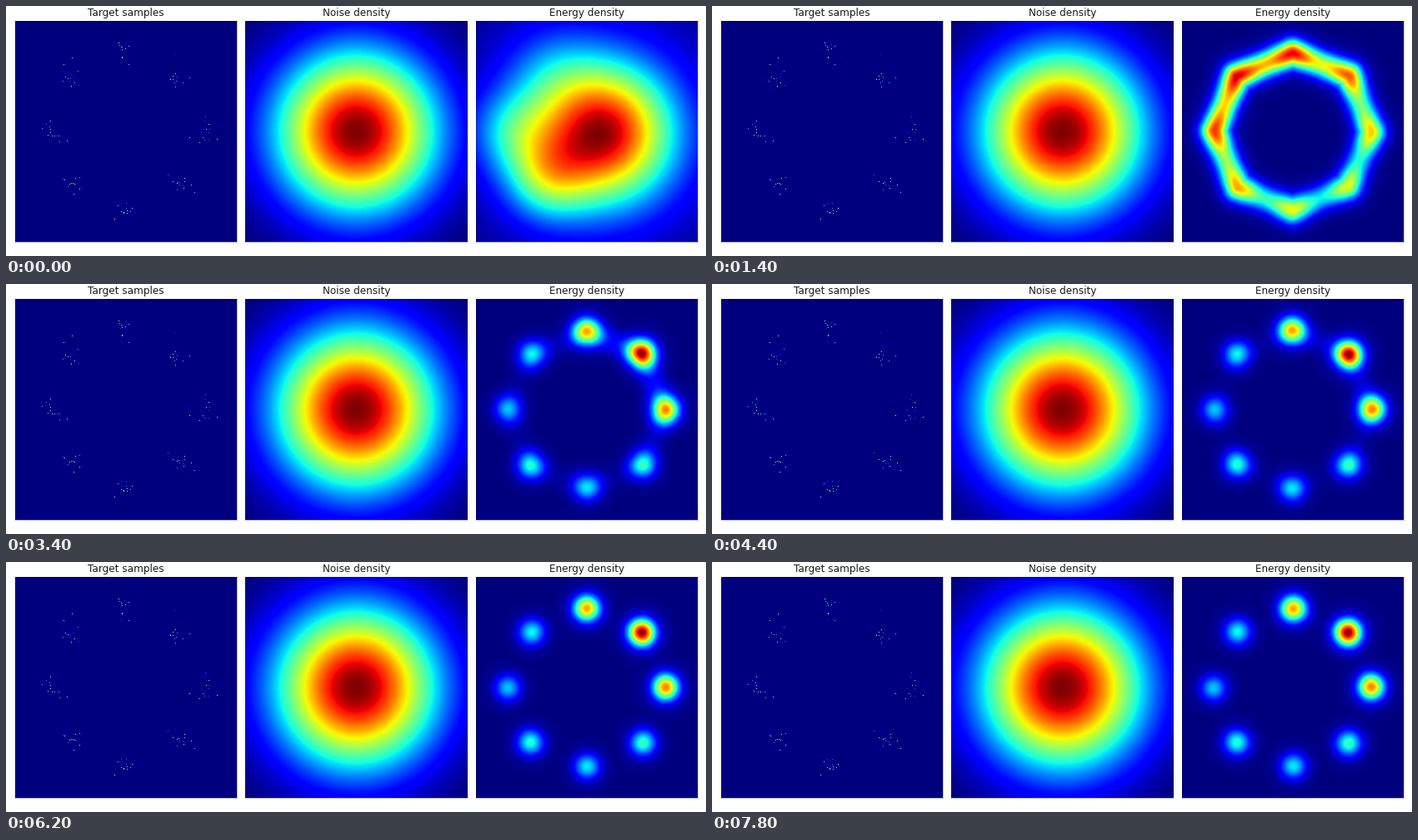
Recreate the animation shown at these times as a matplotlib script. Size 840 by 301 pixels, loop 8000 ms.

```python
import numpy as np
import matplotlib.pyplot as plt
from matplotlib.animation import FuncAnimation

W, H, DPI = 840, 301, 72
FRAMES, STEP = 40, 200
FORMED = 7                      # frame at which the ring is complete
HALF, RING, THICK = 133.0, 95.0, 10.5
plt.rcParams["font.family"] = "DejaVu Sans"

axis = np.linspace(-HALF, HALF, 200)
X, Y = np.meshgrid(axis, axis)
MODES = np.arange(8) * np.pi / 4    # counterclockwise from the right

# frame, heading of the strongest side, mean, swing, squeeze, spread, link
KEYS = np.array([
    [FORMED, 120, 0.78, 0.16, 0.00, 16, 0.80],
    [11, -25, 0.70, 0.25, 0.00, 14, 0.45],
    [17, 40, 0.55, 0.30, 0.15, 12, 0.15],
    [26, 40, 0.55, 0.30, 0.15, 11, 0.02],
])


def gauss(d, s):
    return np.exp(-0.5 * (d / s) ** 2)


def spot(x, y, s):
    return gauss(np.hypot(X - x, Y - y), s)


def start_blob():
    out = 0.9 * spot(19, -2, 57) + 0.1 * spot(10, 0, 110)
    out += 0.32 * spot(-48, -56, 35)
    out += 0.24 * spot(-90, 0, 35)
    out += 0.13 * spot(-45, 72, 40)
    return out / out.max()


def ring_density(i):
    heading, mean, swing, squeeze, spread, link = (
        np.interp(i, KEYS[:, 0], col) for col in KEYS.T[1:])
    peaks = mean + swing * np.cos(MODES - np.radians(heading))
    peaks += squeeze * np.sin(2 * MODES)

    # Neighbouring modes are joined by straight bands
    k = np.arange(8)
    px = RING * np.cos(MODES) + 0.8 * np.sin(1.7 * k + 0.9 * i)
    py = RING * np.sin(MODES) + 0.8 * np.sin(2.3 * k + 0.7 * i)
    total = np.zeros_like(X)
    for a, b in zip(k, np.roll(k, -1)):
        ex, ey = px[b] - px[a], py[b] - py[a]
        size = np.hypot(ex, ey)
        t = ((X - px[a]) * ex + (Y - py[a]) * ey) / size ** 2
        t = np.clip(t, 0, 1)
        dist = np.hypot(X - px[a] - t * ex, Y - py[a] - t * ey)
        base = link * peaks[a] * peaks[b]
        height = (base + (peaks[a] - base) * gauss(t * size, spread)
                  + (peaks[b] - base) * gauss((1 - t) * size, spread))
        profile = 0.93 * gauss(dist, THICK) + 0.07 * gauss(dist, 1.8 * THICK)
        total = np.maximum(total, height * profile)
    return total


BLOB = start_blob()
FIRST_RING = ring_density(FORMED)


def energy(i):
    if i >= FORMED:
        return ring_density(i)
    w = (i / FORMED) ** 0.6
    mix = (BLOB + 0.003) ** (1 - w) * (FIRST_RING + 0.003) ** w
    return mix / mix.max()


def samples(n=266):
    rng = np.random.default_rng(8)
    img = np.zeros((n, n))
    for a in MODES:
        center = n / 2 + 93 * np.array([np.cos(a), np.sin(a)])
        for count, spread, lo, hi in ((45, 10, 0.01, 0.07), (13, 8, 0.15, 0.65)):
            x, y = np.rint(center + rng.normal(0, spread, (count, 2))).astype(int).T
            img[y, x] = rng.uniform(lo, hi, count)
    return img


def noise():
    g = spot(0, 0, HALF / 2)
    return (g - g.min()) / (g.max() - g.min())


fig = plt.figure(figsize=(W / DPI, H / DPI), dpi=DPI, facecolor="white")


def panel(left, title, img, smooth):
    ax = fig.add_axes([left / W, 17 / H, 266 / W, 266 / H])
    ax.set(xticks=[], yticks=[])
    ax.spines[:].set(linewidth=0.5, alpha=0.5)
    ax.set_title(title, fontsize=12, pad=6, color="#1a1a1a")
    return ax.imshow(img, cmap="jet", vmin=0, vmax=1, origin="lower",
                     aspect="auto", interpolation=smooth)


panel(10.7, "Target samples", samples(), "nearest")
panel(287.2, "Noise density", noise(), "bilinear")
field = panel(563.7, "Energy density", BLOB, "bilinear")


def update(i):
    field.set_data(energy(i))
    return [field]


anim = FuncAnimation(fig, update, frames=FRAMES, interval=STEP, repeat=True,
                     repeat_delay=0, init_func=lambda: update(0))
plt.show()
```
